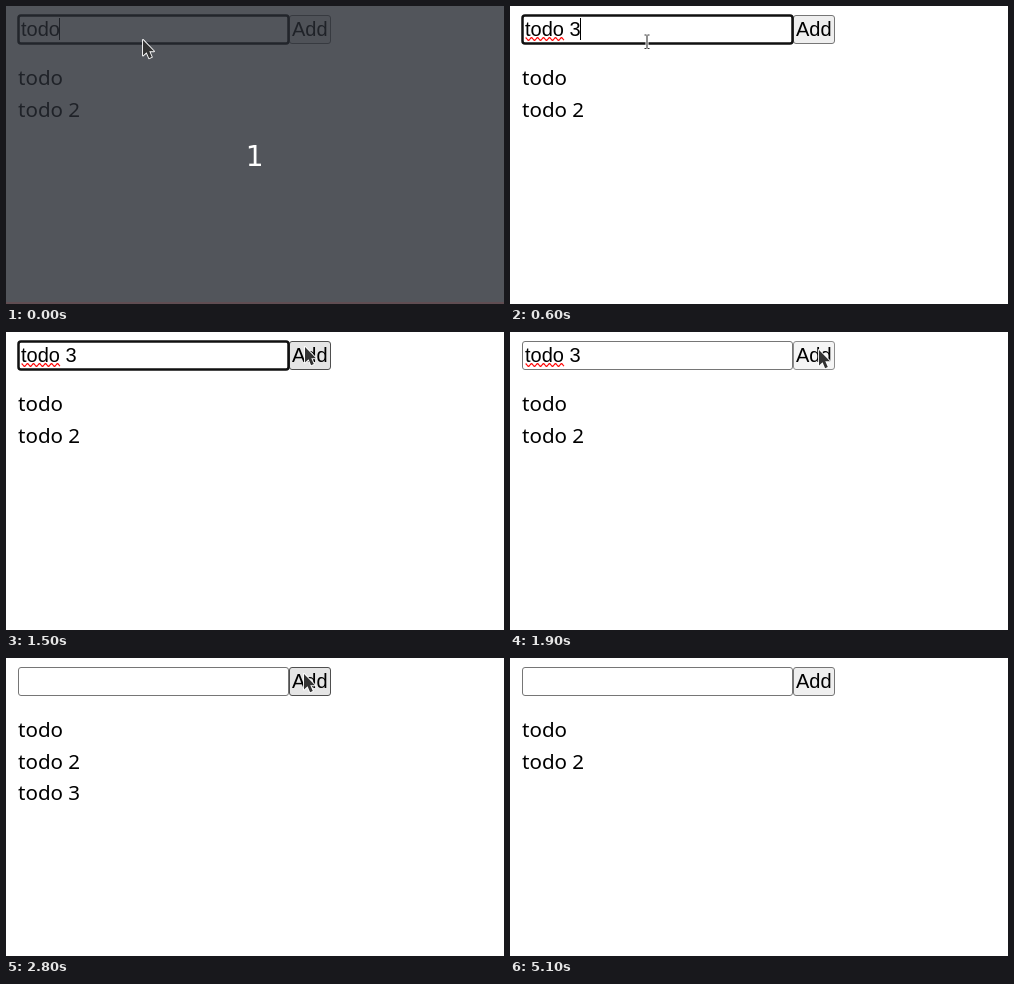
Animation of 498x298 px, one loop 5700 ms. Source, as an HTML page with a canvas:

```html
<!DOCTYPE html>
<html lang="en">
<head>
<meta charset="utf-8">
<title>Todo list</title>
<style>
  html, body { margin: 0; width: 100%; height: 100%; overflow: hidden; background: #fff; }
  canvas { display: block; }
</style>
</head>
<body>
<canvas id="stage" width="498" height="298"></canvas>
<script>
const ctx = document.getElementById("stage").getContext("2d");
const LOOP = 5700;
const CONTROL_FONT = '20px "Liberation Sans", Arial, sans-serif';
const LIST_FONT = '20.6px "Noto Sans", sans-serif';
const COUNT_FONT = '28px "DejaVu Sans", sans-serif';

// Pointer positions: start time, x, y, shape. Each holds until the next.
const POINTER = [
  [0, 137, 34, "arrow"],
  [100, 137, 35, "beam"],
  [1300, 190, 31, "beam"],
  [1400, 256, 23, "beam"],
  [1500, 299, 15, "arrow"],
  [1600, 305, 17, "arrow"],
  [1700, 309, 18, "arrow"],
  [2800, 298, 16, "arrow"],
  [2900, 268, 14, "beam"],
  [3000, 250, 3, "arrow"],
  [3100, 0, 0, "none"],
];

const between = (t, from, to) => t >= from && t < to;

function text(string, x, y, font, color = "#000") {
  ctx.font = font;
  ctx.fillStyle = color;
  ctx.fillText(string, x, y);
}

function box(x, y, w, h, fill, stroke, lineWidth = 1) {
  ctx.beginPath();
  ctx.roundRect(x + 0.5, y + 0.5, w - 1, h - 1, 2.5);
  ctx.fillStyle = fill;
  ctx.fill();
  ctx.lineWidth = lineWidth;
  ctx.strokeStyle = stroke;
  ctx.stroke();
}

function spellingMark(x, y, width) {
  ctx.beginPath();
  for (let i = 0; i <= width; i += 0.5) {
    ctx.lineTo(x + i, y - 1.3 * Math.cos(i * Math.PI / 3));
  }
  ctx.lineWidth = 1.2;
  ctx.strokeStyle = "#f00";
  ctx.stroke();
}

function drawButton(t) {
  const hover = between(t, 1500, 2900);
  const pressed = between(t, 1900, 2000);
  const fill = pressed ? "#f5f5f5" : hover ? "#e5e5e5" : "#efefef";
  const border = pressed ? "#8d8d8d" : hover ? "#4f4f4f" : "#767676";
  box(283, 9, 42, 29, fill, border);
  text("Add", 286, 30, CONTROL_FONT);
}

function drawInput(t) {
  const focused = t < 1900;
  const hover = between(t, 2900, 3000);
  if (focused) box(12, 9, 271, 29, "#fff", "#101010", 2.5);
  else box(12, 9, 271, 29, "#fff", hover ? "#4f4f4f" : "#767676");

  const value = t < 300 ? "todo" : t < 600 ? "todo " : t < 2000 ? "todo 3" : "";
  text(value, 15, 30, CONTROL_FONT);
  if (between(t, 400, 2000)) spellingMark(15.5, 33, 38.5);
  if (focused && !between(t, 1200, 1700)) {
    ctx.fillStyle = "#000";
    ctx.fillRect(Math.floor(15 + ctx.measureText(value).width), 12, 1, 22);
  }
}

function drawList(t) {
  text("todo", 12, 79, LIST_FONT);
  text("todo 2", 12, 111, LIST_FONT);
  if (between(t, 2000, 5100)) text("todo 3", 12, 142, LIST_FONT);
}

function drawCountdown() {
  ctx.fillStyle = "rgba(39, 43, 51, 0.8)";
  ctx.fillRect(0, 0, 498, 298);
  ctx.fillStyle = "rgba(110, 70, 75, 0.5)";
  ctx.fillRect(0, 296, 498, 2);
  text("1", 239.7, 160, COUNT_FONT, "#fff");
}

const ARROW = new Path2D("M0 0V15.5L3.6 12.3L6.1 18.2L8.8 17L6.3 11.3H11Z");
const BEAM = new Path2D("M-2.5 -6.5H-0.5M0.5 -6.5H2.5M0 -6V6.5M-2.5 7H-0.5M0.5 7H2.5");

function drawPointer(t) {
  const [, x, y, shape] = POINTER.findLast(([start]) => t >= start);
  ctx.save();
  ctx.translate(x, y);
  if (shape === "arrow") {
    ctx.lineJoin = "round";
    ctx.lineWidth = 1.8;
    ctx.strokeStyle = "#fff";
    ctx.stroke(ARROW);
    ctx.fillStyle = "#333";
    ctx.fill(ARROW);
  } else if (shape === "beam") {
    ctx.translate(0, 0.5);
    ctx.lineWidth = 3;
    ctx.strokeStyle = "#fff";
    ctx.stroke(BEAM);
    ctx.lineWidth = 1.1;
    ctx.strokeStyle = "#333";
    ctx.stroke(BEAM);
  }
  ctx.restore();
}

function draw(now) {
  const t = now % LOOP;
  ctx.fillStyle = "#fff";
  ctx.fillRect(0, 0, 498, 298);
  drawButton(t);
  drawInput(t);
  drawList(t);
  if (t < 100) drawCountdown();
  drawPointer(t);
}

let startTime;
function tick(now) {
  startTime ??= now;
  draw(now - startTime);
  requestAnimationFrame(tick);
}
requestAnimationFrame(tick);
</script>
</body>
</html>
```
